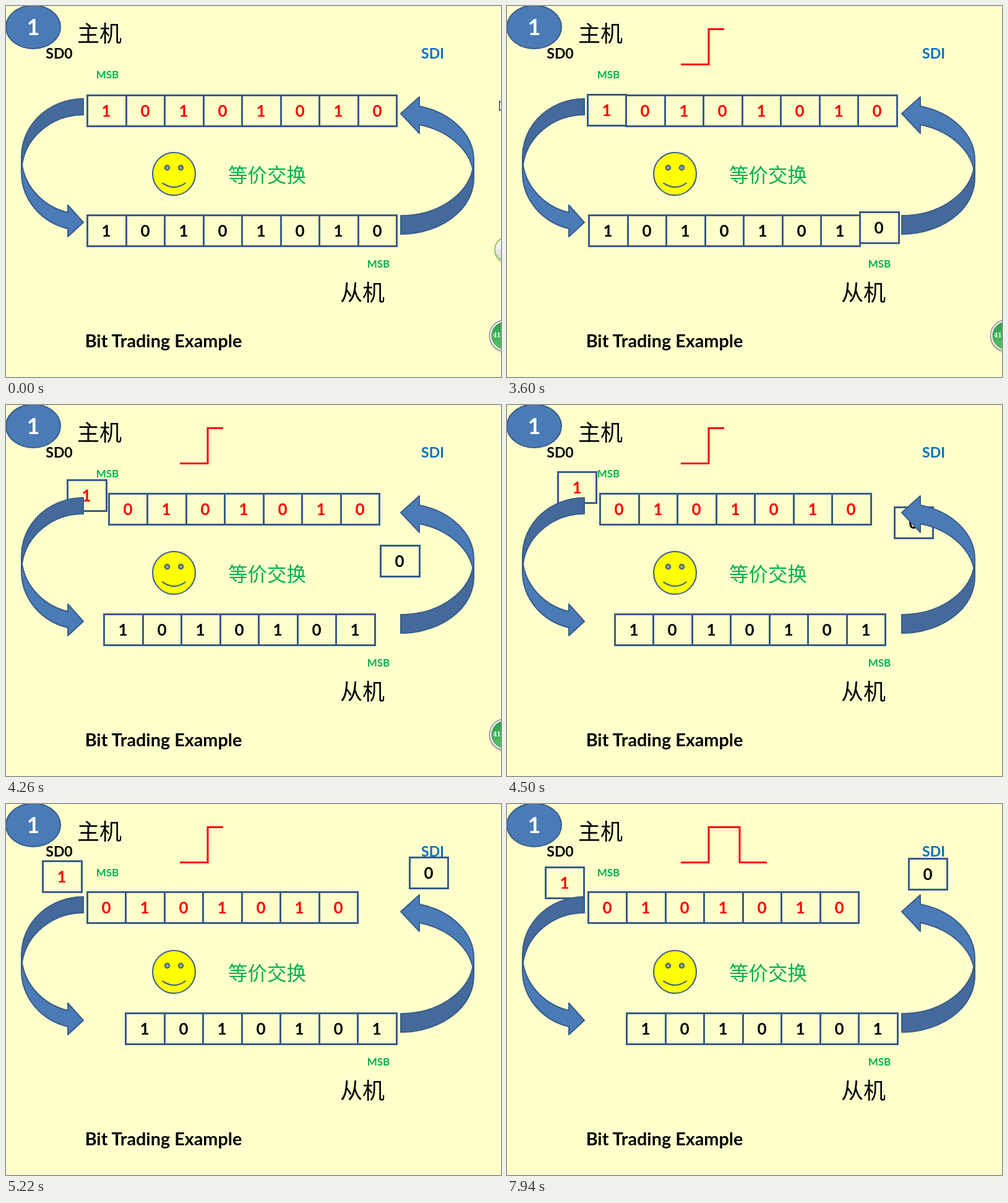
Recreate the animation shown at these times as an HTML page. Size 800 by 600 pixels, loop 8000 ms.

```html
<!DOCTYPE html>
<html lang="zh">
<head>
<meta charset="utf-8">
<title>Bit Trading Example</title>
<style>
  html, body { margin: 0; width: 100%; height: 100%; overflow: hidden; background: #ffffcc; }
  svg { display: block; width: 100%; height: 100%; }
  text { font-family: Lato, "Open Sans", sans-serif; font-weight: 700; }
  .cjk { font-family: "Noto Sans CJK SC", "Noto Sans CJK", serif; font-weight: 300; }
  .mid { text-anchor: middle; }
  .line { stroke: #385d8a; stroke-width: 2; }
  .cell rect { fill: #ffffcc; stroke: #385d8a; stroke-width: 3; }
  .cell text { font-size: 26px; text-anchor: middle; }
  .wave { fill: none; stroke: #f00; stroke-width: 3; }
</style>
</head>
<body>
<svg viewBox="0 0 800 600">
  <defs>
    <clipPath id="riseClip"><rect id="riseWipe" x="281" y="30" width="0" height="74"/></clipPath>
    <clipPath id="fallClip"><rect id="fallWipe" x="350" y="30" width="0" height="74"/></clipPath>
    <linearGradient id="pale" x2="0" y2="1">
      <stop offset="0" stop-color="#fff"/><stop offset="1" stop-color="#d4d4d4"/>
    </linearGradient>
    <linearGradient id="leaf" x2="0" y2="1">
      <stop offset="0" stop-color="#2f9e4c"/><stop offset="1" stop-color="#55c463"/>
    </linearGradient>
  </defs>
  <rect width="800" height="600" fill="#ffffcc"/>

  <ellipse class="line" cx="44" cy="34" rx="44" ry="35" fill="#4a7bb7"/>
  <text class="mid" x="44" y="47" font-size="36" fill="#fff">1</text>
  <text class="cjk" x="115" y="58" font-size="36">主机</text>
  <text class="cjk" x="540" y="477" font-size="36">从机</text>
  <text class="cjk" x="359" y="285" font-size="31.5" fill="#00b050">等价交换</text>
  <text class="mid" x="86" y="85" font-size="23">SD0</text>
  <text class="mid" x="689.5" y="85" font-size="23" fill="#0070c0">SDI</text>
  <text class="mid" x="164" y="117" font-size="17" fill="#00b050">MSB</text>
  <text class="mid" x="602" y="423" font-size="17" fill="#00b050">MSB</text>
  <text class="mid" x="254.5" y="552" font-size="28.8">Bit Trading Example</text>

  <path class="wave" clip-path="url(#riseClip)" d="M281 94.5H326V37.5H351"/>
  <path class="wave" clip-path="url(#fallClip)" d="M350 37.5H376V94.5H420"/>

  <g class="line" fill="#ff0">
    <circle cx="271.5" cy="271.5" r="34.5"/>
    <circle cx="260.5" cy="261.5" r="3.7" fill="#98a56c"/>
    <circle cx="282.5" cy="261.5" r="3.7" fill="#98a56c"/>
    <path d="M252.5 286Q271.5 300 290.5 286" fill="none"/>
  </g>

  <g id="cells"></g>

  <g class="line" fill="#4a7bb7" stroke-linejoin="round">
    <path fill="#44699b" d="M125 176A100 93.5 0 0 0 26 256.5A100 93.5 0 0 1 125 150Z"/>
    <path d="M25 243.5A100 93.5 0 0 0 100 334V322L125 350L100 373V360A100 93.5 0 0 1 25 269.5Z"/>
    <path fill="#44699b" d="M638 339A118 90 0 0 0 754.3 264A118 90 0 0 1 638 369Z"/>
    <path d="M756 279A118 90 0 0 0 668 192V206L638 174L668 147V162A118 90 0 0 1 756 249Z"/>
  </g>

  <path id="pointer" d="M797.5 153.5V169.5L801 166L808 164Z" fill="#fff" stroke="#000"/>
  <g id="button">
    <circle cx="810" cy="397" r="21" fill="#000" opacity=".12"/>
    <circle cx="810" cy="394" r="20" fill="url(#pale)" stroke="#8ccb4e" stroke-width="2"/>
  </g>
  <g id="badge">
    <circle cx="807" cy="535" r="27" fill="#000" opacity=".12"/>
    <circle cx="807" cy="533" r="25.5" fill="#f4f4f4" stroke="#8f8f8f" stroke-width="1.5"/>
    <circle cx="807" cy="533" r="22" fill="url(#leaf)" stroke="#3c8a4c"/>
    <text x="787" y="536" font-size="11" fill="#fff" style="font-family:'Noto Serif',serif">41</text>
  </g>
</svg>
<script>
const LOOP = 8000, PITCH = 62.5, MOVE = 1790;
const NS = "http://www.w3.org/2000/svg";
const $ = id => document.getElementById(id);

function add(parent, tag, attrs, text) {
  const el = document.createElementNS(NS, tag);
  for (const key in attrs) el.setAttribute(key, attrs[key]);
  if (text) el.textContent = text;
  return parent.appendChild(el);
}

function addCells(bits, color) {
  return [...bits].map(bit => {
    const group = add($("cells"), "g", { class: "cell", fill: color });
    const box = add(group, "rect", { x: 1.5, y: 1.5, height: 50 });
    add(group, "text", { x: 32, y: 36 }, bit);
    return { group, box };
  });
}

// Cells sit on whole pixels, so neighbouring widths alternate.
function place(cells, x, y) {
  cells.forEach(({ group, box }, i) => {
    const left = Math.floor(x + i * PITCH);
    const right = Math.floor(x + (i + 1) * PITCH);
    group.setAttribute("transform", `translate(${left} ${Math.floor(y)})`);
    box.setAttribute("width", right - left);
  });
}

// Each part visits its stops in turn: start, after the first move, after the second.
const parts = [
  { cells: addCells("0101010", "#f00"), stops: [[193.1, 143.2], [130.2, 141.9], [130.2, 141.9]] },
  { cells: addCells("1010101", "#000"), stops: [[130.6, 337.1], [192.6, 337.1], [192.6, 337.1]] },
  { cells: addCells("1", "#f00"), stops: [[130.6, 143.2], [58.6, 91.5], [130.6, 337.1]] },
  { cells: addCells("0", "#000"), stops: [[568.1, 337.1], [651.3, 85.1], [568.1, 141.9]] }
];

const ramp = (t, start, length) => Math.min(1, Math.max(0, (t - start) / length));
const ease = u => u < 0.5 ? 2 * u * u : 1 - 2 * (1 - u) ** 2;
const show = (id, on) => { $(id).style.display = on ? "" : "none"; };

// The picture advances in 60 ms steps, shifted by 20 ms after the pause.
function step(t) {
  const shift = t < 5500 ? 0 : 20;
  return Math.floor((t - shift) / 60) * 60 + shift;
}

function draw(time) {
  const t = step(time);
  const first = ease(ramp(t, 3420, MOVE));
  const second = ease(ramp(t, 7690, MOVE));
  for (const { cells, stops: [a, b, c] } of parts) {
    const [x, y] = [0, 1].map(k => a[k] + (b[k] - a[k]) * first + (c[k] - b[k]) * second);
    place(cells, x, y);
  }
  $("riseWipe").setAttribute("width", 70 * ramp(t, 1800, 480));
  $("fallWipe").setAttribute("width", 70 * ramp(t, 5960, 540));
  show("pointer", time < 660);
  show("button", time < 860);
  show("badge", time < 4500);
}

const origin = performance.now();
function tick() {
  draw((performance.now() - origin) % LOOP);
  requestAnimationFrame(tick);
}
tick();
</script>
</body>
</html>
```
